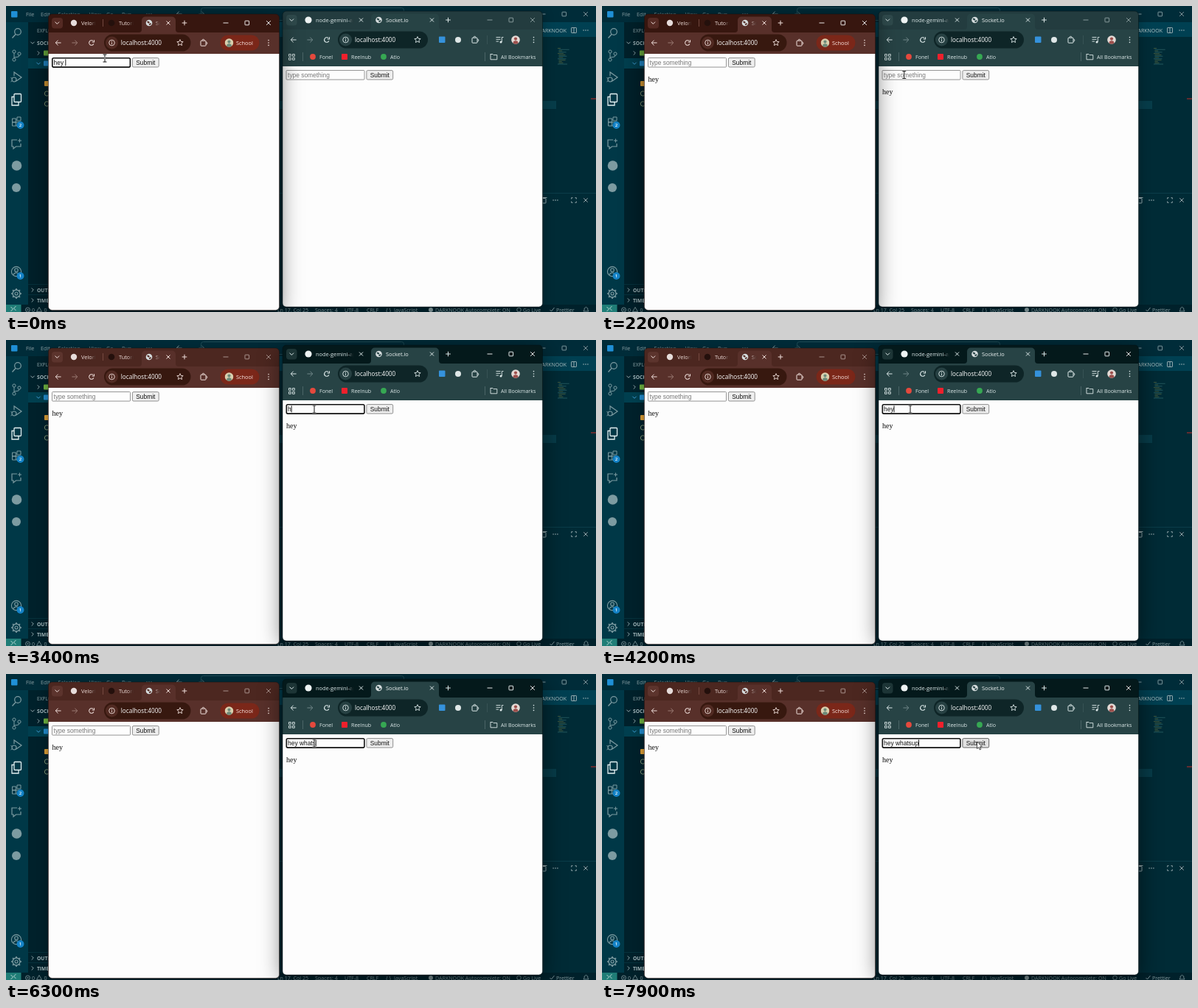
Write an HTML page with a canvas that moves like this. It is 800 by 416 pixels and loops after 8 s.

```html
<!DOCTYPE html>
<html lang="en">
<head>
<meta charset="utf-8">
<title>Socket chat demo</title>
<style>
html, body { margin: 0; width: 100%; height: 100%; overflow: hidden; background: #002b36; }
canvas { display: block; width: 800px; height: 416px; }
</style>
</head>
<body>
<canvas id="stage" width="800" height="416"></canvas>
<script>
const c = document.getElementById('stage').getContext('2d');
const LOOP = 8000, STEP = 100;
const UI = '"Open Sans", "Noto Sans", sans-serif';
const ARIAL = '"Liberation Sans", Arial, sans-serif';
const SERIF = '"Liberation Serif", "Times New Roman", serif';

// drawing helpers
function rect(x, y, w, h, fill, r = 0) {
  c.beginPath();
  c.roundRect(x, y, w, h, r);
  c.fillStyle = fill;
  c.fill();
}
function frame(x, y, w, h, color, lw = 1, r = 0) {
  c.beginPath();
  c.roundRect(x, y, w, h, r);
  c.strokeStyle = color;
  c.lineWidth = lw;
  c.stroke();
}
function line(pts, color, lw = 1) {
  c.beginPath();
  for (let i = 0; i < pts.length; i += 2) c.lineTo(pts[i], pts[i + 1]);
  c.strokeStyle = color;
  c.lineWidth = lw;
  c.stroke();
}
function disc(x, y, r, fill) {
  c.beginPath();
  c.arc(x, y, r, 0, 7);
  c.fillStyle = fill;
  c.fill();
}
function ring(x, y, r, color, lw = 1, a = 0, b = Math.PI * 2) {
  c.beginPath();
  c.arc(x, y, r, a, b);
  c.strokeStyle = color;
  c.lineWidth = lw;
  c.stroke();
}
function text(s, x, y, size, color, family = UI, weight = 400, align = 'left') {
  c.font = `${weight} ${size}px ${family}`;
  c.textAlign = align;
  c.fillStyle = color;
  c.fillText(s, x, y);
}
function fadeText(s, x, y, end, color) {
  const g = c.createLinearGradient(end - 9, 0, end, 0);
  g.addColorStop(0, color);
  g.addColorStop(1, 'transparent');
  text(s, x, y, 7.4, g);
}

// icons
const cross = (x, y, r, color, lw = 1) => {
  line([x - r, y - r, x + r, y + r], color, lw);
  line([x - r, y + r, x + r, y - r], color, lw);
};
const plus = (x, y, r, color) => {
  line([x - r, y, x + r, y], color);
  line([x, y - r, x, y + r], color);
};
const chevron = (x, y, r, color, right) => line(right
  ? [x - r / 2, y - r, x + r / 2, y, x - r / 2, y + r]
  : [x - r, y - r / 2, x, y + r / 2, x + r, y - r / 2], color);
const arrow = (x, y, dir, color) => {
  line([x - 3.6, y, x + 3.6, y], color);
  line([x + dir * .4, y - 3.4, x + dir * 3.8, y, x + dir * .4, y + 3.4], color);
};
const dots = (x, y, dx, dy, color) => {
  for (let i = -1; i < 2; i++) disc(x + i * dx, y + i * dy, .8, color);
};
function reload(x, y, color) {
  ring(x, y, 3.3, color, 1.1, .5, 5.4);
  line([x + 3.5, y - 3.8, x + 3.5, y - 1, x + .8, y - 1], color, 1.1);
}
function star(x, y, color) {
  const p = [];
  for (let i = 0; i <= 10; i++) {
    const r = i % 2 ? 2 : 4.4, a = i * Math.PI / 5 - Math.PI / 2;
    p.push(x + r * Math.cos(a), y + r * Math.sin(a));
  }
  line(p, color, .9);
}
function puzzle(x, y, color) {
  frame(x - 4, y - 2.8, 7, 7, color, 1, .8);
  ring(x - .5, y - 3.2, 1.5, color, 1, Math.PI, 0);
  ring(x + 3.3, y + .6, 1.5, color, 1, -1.6, 1.6);
}
function globe(x, y, bg) {
  disc(x, y, 4.3, '#d5dcdd');
  c.beginPath();
  c.ellipse(x - 1, y - 1, 1.9, 1.2, .6, 0, 7);
  c.ellipse(x + 1.4, y + 1.6, 1.7, 1.1, -.5, 0, 7);
  c.fillStyle = bg;
  c.fill();
}
function info(x, y, color) {
  ring(x, y, 3.8, color, .9);
  line([x, y - .5, x, y + 2.2], color, .9);
  disc(x, y - 1.8, .6, color);
}
function portrait(x, y, bg, body) {
  c.save();
  c.beginPath();
  c.arc(x, y, 5.8, 0, 7);
  c.clip();
  rect(x - 6, y - 6, 12, 12, bg);
  disc(x, y - 1.4, 2.1, body);
  rect(x - 3.4, y + 1.2, 6.8, 7, body, 3);
  c.restore();
}
function winButtons(x, y, color) {
  line([x - 3.5, y, x + 3.5, y], color, .9);
  frame(x + 26, y - 2.8, 5.6, 5.6, color, .9, .6);
  cross(x + 58, y, 2.9, color, .9);
}

// editor behind the windows
function activityBar() {
  const k = '#7d9ba1';
  rect(0, 22, 30, 384, '#003847');
  ring(16, 35, 4.3, k, 1.2);
  line([13, 38.5, 8.5, 43.5], k, 1.3);
  for (const [x, y] of [[11, 62], [11, 73], [18, 65]]) ring(x, y, 2.1, k);
  line([11, 64, 11, 71], k);
  line([18, 67, 17, 69, 11, 70], k);
  line([11, 95, 11, 90, 21, 97, 14, 102], k, 1.2);
  ring(11, 100, 3, k, 1.2);
  line([6.5, 97, 8.5, 99], k);
  line([6.5, 103, 8.5, 101.5], k);
  frame(11, 119.5, 9.5, 11, '#e4eef0', 1.3, 1);
  line([11, 123.5, 8, 123.5, 8, 135, 17, 135, 17, 131], '#e4eef0', 1.3);
  frame(8.5, 153, 5, 5, k);
  frame(8.5, 158, 5, 5, k);
  frame(13.5, 158, 5, 5, k);
  frame(15, 151, 5, 5, k);
  line([15, 182, 8, 182, 8, 191, 10, 191, 10, 194, 13.5, 191, 20, 191, 20, 187], k, 1.2);
  plus(18.5, 183, 2.5, k);
  disc(14.5, 217, 6.8, k);
  disc(14, 247, 6, k);
  ring(14, 361, 6.6, k, 1.1);
  ring(14, 359, 2.3, k, 1.1);
  ring(14, 367, 4.3, k, 1.1, 3.5, 5.9);
  ring(14, 391, 2, k, 1.1);
  ring(14, 391, 5, k, 1.3);
  for (let i = 0; i < 8; i++) {
    const a = i * Math.PI / 4, s = Math.sin(a), q = Math.cos(a);
    line([14 + 5 * q, 391 + 5 * s, 14 + 7 * q, 391 + 7 * s], k, 1.7);
  }
  for (const [y, n] of [[162, '2'], [367, '1']]) {
    disc(19.5, y, 5, '#1583c7');
    text(n, 19.5, y + 2.2, 6, '#fff', UI, 600, 'center');
  }
}
function sideBar() {
  const k = '#8fa5a9';
  rect(30, 22, 170, 384, '#00212b');
  text('EXPLORER', 42, 35.8, 6.6, k);
  rect(30, 71, 170, 14, '#003f4f');
  chevron(36, 50, 2.6, k);
  text('SOCKET', 42, 52.6, 6.7, '#a9bcc0', UI, 700);
  chevron(44, 64, 2.6, k, true);
  chevron(44, 78, 2.6, '#3d9bd0');
  rect(51, 60.5, 9, 7, '#6cae3f', 1);
  rect(51, 74.5, 9, 7, '#2389c9', 1);
  rect(52, 102, 8, 7, '#d69a35', 1);
  ring(55.5, 119, 3.2, '#7f8f70');
  ring(55.5, 133, 3.2, '#7f8f70');
  for (const [y, s] of [[386, 'OUTLINE'], [400, 'TIMELINE']]) {
    line([30, y - 7.5, 200, y - 7.5], '#0a3541', .8);
    chevron(36, y, 2.6, k, true);
    text(s, 42, y + 2.6, 6.7, '#a9bcc0', UI, 700);
  }
}
function titleBar() {
  const k = '#8ea2a6';
  rect(0, 0, 800, 22, '#002c39');
  rect(7, 7, 8.5, 8.5, '#1f8fd6', 1);
  const menu = [['File', 27], ['Edit', 47], ['Selection', 70.5], ['View', 113], ['Go', 136], ['Run', 157]];
  for (const [s, x] of menu) text(s, x, 13.8, 7.2, k);
  dots(194, 11, 3, 0, k);
  arrow(235, 11, -1, k);
  arrow(265, 11, 1, '#4d686e');
  frame(264.5, 2.5, 275, 17, '#24505a', .9, 3);
  winButtons(728, 11, k);
}
function editorPane() {
  const k = '#a4b5b8';
  rect(200, 22, 600, 20, '#004052');
  text('DARKNOOK', 760, 35.7, 7, '#b5c4c6', UI, 400, 'right');
  frame(766.5, 29.5, 7, 7, k, .9, .6);
  line([770, 29.5, 770, 36.5], k, .9);
  dots(786, 33, 2.9, 0, k);
  rect(200, 129, 546, 11, '#073c49');
  for (let i = 0; i < 13; i++) {
    const h = Math.abs(Math.sin(i * 12.9898) * 43758.5453) % 1;
    rect(748 + (i % 4 ? 1.5 : 0), 57 + i * 1.8, 4 + h * 11, .8, h > .5 ? '#2c6266' : '#4d6140');
  }
  rect(793, 125.5, 7, 1.2, '#a52c2c');
  line([200, 254.5, 800, 254.5], '#0b3d49', 1);
  frame(727, 261.5, 5, 6.5, k, .9, .6);
  line([725.5, 260.5, 733.5, 260.5], k, .9);
  dots(745, 264, 2.9, 0, k);
  for (const sx of [-1, 1]) for (const sy of [-1, 1])
    line([770 + sx * 1.5, 264 + sy * 3.3, 770 + sx * 3.3, 264 + sy * 3.3, 770 + sx * 3.3, 264 + sy * 1.5], k, .9);
  cross(786, 264, 2.7, k, .9);
}
function statusBar() {
  const k = '#83989c', y = 415.6;
  rect(0, 406, 800, 10, '#00212b');
  rect(0, 406, 20.5, 10, '#1f7d77');
  line([6.5, 409, 9.5, 412, 6.5, 415], '#c6dedb', .9);
  line([13.5, 408, 10.5, 411, 13.5, 414], '#c6dedb', .9);
  ring(29.5, 413, 3, k, .8);
  cross(29.5, 413, 1.2, k, .7);
  text('0', 35, y, 7.1, k);
  line([41.5, 415.6, 45, 409.5, 48.5, 415.6, 41.5, 415.6], k, .8);
  text('0', 51.5, y, 7.1, k);
  text('Ln 17, Col 25', 410, y, 7.1, k, UI, 400, 'right');
  const items = [['Spaces: 4', 419], ['UTF-8', 459], ['CRLF', 489], ['{ }', 515], ['JavaScript', 526],
    ['DARKNOOK Autocomplete: ON', 582], ['Go Live', 701], ['Prettier', 746]];
  for (const [s, x] of items) text(s, x, y, 7.1, k);
  disc(576, 413, 3, k);
  ring(695.5, 413, 2.8, k, .8);
  line([737.5, 413, 739.5, 415, 743.5, 410], k, .9);
  line([783, 415, 784.2, 413, 784.2, 411, 786.5, 409.3, 788.8, 411, 788.8, 413, 790, 415, 783, 415], k, .8);
}

// browser windows
function shell(x, y, w, h, active, strip) {
  c.save();
  c.shadowColor = active ? 'rgba(0,0,0,.55)' : 'rgba(0,0,0,.3)';
  c.shadowBlur = active ? 30 : 16;
  c.shadowOffsetY = active ? 6 : 3;
  rect(x, y, w, h, strip, 5);
  c.restore();
  c.save();
  c.beginPath();
  c.roundRect(x, y, w, h, 5);
  c.clip();
}
function activeTab(x, w, top, bottom, color) {
  rect(x, top, w, bottom - top + 1, color, [5, 5, 0, 0]);
  c.beginPath();
  c.moveTo(x - 4, bottom);
  c.quadraticCurveTo(x, bottom, x, bottom - 4);
  c.lineTo(x + w, bottom - 4);
  c.quadraticCurveTo(x + w, bottom, x + w + 4, bottom);
  c.fill();
}
function navButtons(x, y, color, dim) {
  arrow(x, y, -1, color);
  arrow(x + 22, y, 1, dim);
  reload(x + 45, y, color);
}
function form(x, y, s) {
  if (s.focus) frame(x + .8, y + .7, 105.6, 12.4, '#111', 1.6, 1.8);
  else frame(x + .5, y + .5, 106, 12.6, '#8a8a8a', .9, 1);
  text(s.value || 'type something', x + 2.6, y + 9.7, 8.4, s.value ? '#111' : '#787878', ARIAL);
  if (s.caret) {
    const cx = x + 3 + (s.value ? c.measureText(s.value).width : 0);
    line([cx, y + 2.3, cx, y + 11.3], '#000', .9);
  }
  rect(x + 109, y + .3, 36.5, 13, s.hover ? '#e2e2e2' : '#efefef', 1.6);
  frame(x + 109.4, y + .6, 35.8, 12.4, s.hover ? '#555' : '#858585', .9, 1.6);
  text('Submit', x + 127.3, y + 9.7, 8.4, '#111', ARIAL, 400, 'center');
  if (s.message) text('hey', x + .4, y + 32.6, 10.1, '#111', SERIF);
}
function leftWindow(active, s) {
  const strip = active ? '#37160f' : '#4c2720', bar = '#58302a', k = '#f0dfdb';
  shell(57.5, 11, 313, 402.5, active, strip);
  rect(62, 16, 15, 14.5, active ? '#542a23' : '#5c342d', 4);
  chevron(69.3, 23, 2.8, k);
  disc(92, 23, 4.2, '#e6dcda');
  fadeText('Velori', 102, 25.7, 124, k);
  line([131.5, 18, 131.5, 28], '#7a4d45', .9);
  disc(143, 23, 4.3, '#24100c');
  fadeText('Tutorial', 153, 25.7, 175, k);
  activeTab(184, 46, 14.5, 36, bar);
  globe(194, 23, bar);
  fadeText('Soc', 203, 25.7, 212, k);
  cross(220, 23, 2.5, k);
  plus(242, 23, 3.3, k);
  winButtons(298, 23, active ? '#fff' : '#b39d98');
  rect(57, 36, 314, 29, bar);
  navButtons(71, 50, k, '#9a7a73');
  rect(133, 38.5, 117.5, 23, '#37180f', 11.5);
  disc(143.5, 50, 8.5, '#512a22');
  info(143.5, 50, k);
  text('localhost:4000', 155.8, 52.8, 8.2, '#fff');
  star(236, 50, k);
  puzzle(268, 50, k);
  rect(290.5, 39.5, 53, 21, '#7b2719', 10.5);
  portrait(302.5, 50, '#d9cfae', '#6d8a79');
  text('School', 312, 52.7, 7.4, '#fbe9e5');
  dots(356, 50, 0, 3.4, k);
  rect(57, 65, 314, 349, '#fdfdfd');
  form(62, 70, s);
  c.restore();
  frame(57.5, 11, 313, 402.5, 'rgba(30,15,12,.55)', .8, 5);
}
function rightWindow(active, s) {
  const strip = active ? '#04191b' : '#233c3f', bar = '#274345', k = '#dce8e8';
  shell(375, 7, 352.5, 402, active, strip);
  rect(380, 12, 14.5, 14.5, active ? '#1d3536' : '#2f4a4c', 4);
  chevron(387.3, 19, 2.8, k);
  disc(410, 19, 4.6, '#eef3f3');
  fadeText('node-gemini-api', 420, 21.7, 473, k);
  cross(481.5, 19, 2.5, k);
  activeTab(495, 92, 10.5, 32, bar);
  globe(505.5, 19, bar);
  text('Socket.io', 515, 21.7, 7.4, '#f1f6f6');
  cross(577.5, 19, 2.5, k);
  plus(599.5, 19, 3.3, k);
  winButtons(656, 19, active ? '#fff' : '#93a5a6');
  rect(375, 32, 353, 50, bar);
  navButtons(390, 46, k, '#708688');
  rect(450, 34.5, 122, 23, '#0e2527', 11.5);
  disc(460.5, 46, 8.5, '#274143');
  info(460.5, 46, k);
  text('localhost:4000', 473, 48.8, 8.2, '#fff');
  star(558, 46, k);
  rect(587, 41.5, 8.5, 8.5, '#3592dc', 1);
  disc(613, 46, 4, '#dfe7e7');
  puzzle(636, 46, k);
  line([652.5, 40, 652.5, 52], '#3b5759', .8);
  for (let i = 0; i < 3; i++) line([664.5, 42.5 + i * 2.8, i < 2 ? 670.5 : 668, 42.5 + i * 2.8], k, .9);
  disc(671, 49, 1.5, k);
  line([672.3, 49, 672.3, 42.5, 674.5, 42.5], k, .9);
  portrait(691, 46, '#e4dad5', '#9d4f4c');
  dots(715.5, 46, 0, 3.4, k);
  for (const x of [383.5, 388.5]) for (const y of [65.5, 70.5]) frame(x, y, 2.8, 2.8, k, .9);
  line([402.5, 63, 402.5, 75], '#50696b', .9);
  disc(416, 69, 3.9, '#e5493d');
  text('Fonel', 425, 71.6, 7.1, k);
  rect(455, 65, 8, 8, '#f0202c', 1);
  text('Reelnub', 468, 71.6, 7.1, k);
  disc(512, 69, 3.9, '#36a853');
  text('Atlo', 521, 71.6, 7.1, k);
  line([649.5, 63, 649.5, 75], '#50696b', .9);
  line([657, 65.5, 660, 65.5, 661, 66.6, 665.8, 66.6, 665.8, 72.8, 657, 72.8, 657, 65], k, .9);
  text('All Bookmarks', 671, 71.6, 7.1, k);
  rect(375, 82, 353, 328, '#fdfdfd');
  form(379.5, 87, s);
  c.restore();
  frame(375, 7, 352.5, 402, 'rgba(0,15,17,.6)', .8, 5);
}

// pointer
const PATH = [[0, 134, 71], [400, 134, 71], [900, 177, 82.5], [1400, 177, 82.5], [2300, 418, 94],
  [7100, 418, 94], [7700, 508.5, 92], [8000, 508.5, 92]];
function pointerAt(t) {
  let i = 1;
  while (t > PATH[i][0]) i++;
  const [t0, x0, y0] = PATH[i - 1], [t1, x1, y1] = PATH[i];
  const p = (t - t0) / (t1 - t0), e = p * p * (3 - 2 * p);
  return [x0 + (x1 - x0) * e, y0 + (y1 - y0) * e];
}
const inside = (x, y, l, t, w) => x >= l && x <= l + w && y >= t && y <= t + 13.5;
function drawPointer(x, y, beam) {
  if (beam) {
    for (const [col, lw] of [['#fff', 2], ['#111', 1]]) {
      line([x, y - 5, x, y + 5], col, lw);
      line([x - 2.5, y - 5, x + 2.5, y - 5], col, lw);
      line([x - 2.5, y + 5, x + 2.5, y + 5], col, lw);
    }
    return;
  }
  c.beginPath();
  const p = [0, 0, 0, 9.6, 2.2, 7.6, 3.7, 11, 5.3, 10.3, 3.8, 7, 6.8, 6.8];
  for (let i = 0; i < p.length; i += 2) c.lineTo(x + p[i], y + p[i + 1]);
  c.closePath();
  c.fillStyle = '#fff';
  c.fill();
  c.strokeStyle = '#222';
  c.lineWidth = .8;
  c.stroke();
}

// timeline
const KEYS = [3400, 3700, 4000, 4600, 4800, 5300, 5600, 5900, 6200, 6600, 6900];
const REPLY = 'hey whatsup', SENT = 1100, HEARD = 1400, SWITCH = 2500;

function draw(t) {
  const typed = KEYS.filter(k => k <= t).length;
  const lastKey = typed ? KEYS[typed - 1] : SWITCH;
  const blink = from => (t - from) % 1000 < 500;
  const [x, y] = pointerAt(t);
  const rightOn = t >= SWITCH;
  const left = {
    value: t < SENT ? 'hey ' : '', focus: t < SENT - 100, caret: t < SENT - 100 && blink(0),
    hover: inside(x, y, 171, 70, 36.5), message: t >= SENT
  };
  const right = {
    value: REPLY.slice(0, typed), focus: rightOn, caret: rightOn && blink(lastKey),
    hover: inside(x, y, 488.5, 87, 36.5), message: t >= HEARD
  };
  rect(0, 0, 800, 416, '#002b36');
  editorPane();
  sideBar();
  activityBar();
  titleBar();
  statusBar();
  if (rightOn) {
    leftWindow(false, left);
    rightWindow(true, right);
  } else {
    rightWindow(false, right);
    leftWindow(true, left);
  }
  drawPointer(x, y, inside(x, y, 62, 70, 107) || inside(x, y, 379.5, 87, 107));
}

function tick() {
  draw(Math.floor(performance.now() % LOOP / STEP) * STEP);
  requestAnimationFrame(tick);
}
tick();
</script>
</body>
</html>
```
